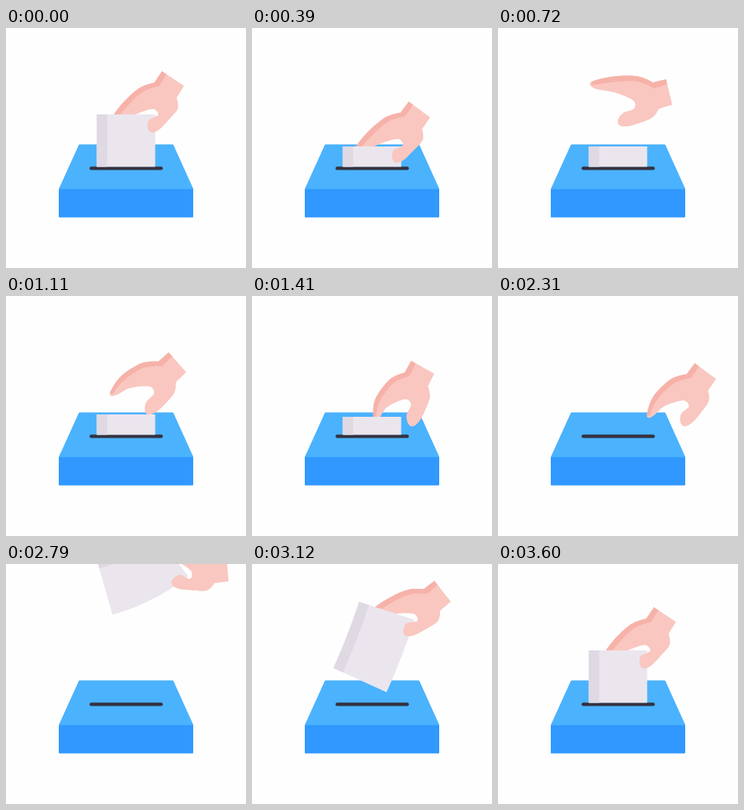
An HTML page for the animation above (5.63 s loop, 300 by 300 pixels).

```html
<!DOCTYPE html>
<html lang="en">
<head>
<meta charset="utf-8">
<title>Ballot box</title>
<style>
  html, body { margin: 0; width: 100%; height: 100%; overflow: hidden; background: #fefefe; }
  svg { display: block; width: 100vw; height: 100vh; }
</style>
</head>
<body>
<svg viewBox="0 0 300 300">
  <defs><clipPath id="aboveSlot"><rect x="-200" y="-300" width="800" height="473.6"/></clipPath></defs>
  <g stroke-width="2" stroke-linejoin="round">
    <path d="M92 146.5H208.3L233.2 201.5H67Z" fill="#4bb2fe" stroke="#4bb2fe"/>
    <path d="M67 202.5H233V235.7H67Z" fill="#3098ff" stroke="#3098ff"/>
  </g>
  <path d="M106.5 175.4H194" stroke="#35323f" stroke-width="4.2" stroke-linecap="round"/>
  <path id="hand" fill="#f9c7c0"/>
  <path id="shade" fill="#f6b2a9"/>
  <g clip-path="url(#aboveSlot)">
    <path id="sheet" fill="#ebe6ee"/>
    <path id="fold" fill="#dfd9e4"/>
  </g>
  <path id="thumb" fill="#f9c7c0"/>
</svg>
<script>
const LOOP = 5630, MOVE = 3600, STEP = 30;
const RELEASE = 330, PRESS = 1350, GONE = 1710, RETURN = 2640;
const GRIP_ANGLE = 33.7, SHEET_W = 73, SHEET_L = 93, FOLD_W = 13;
const HOME = { x: 195, y: 54 };

const el = id => document.getElementById(id);
const rad = deg => deg * Math.PI / 180;
const mix = (a, b, k) => a + (b - a) * k;
const mixPoint = (p, q, k) => [mix(p[0], q[0], k), mix(p[1], q[1], k)];
const add = (p, q, k = 1) => [p[0] + q[0] * k, p[1] + q[1] * k];
const turn = ([x, y], deg) => {
  const c = Math.cos(rad(deg)), s = Math.sin(rad(deg));
  return [x * c - y * s, x * s + y * c];
};
const turnAbout = (p, pivot, deg, scale = 1) => add(pivot, turn(add(p, pivot, -1), deg), scale);
const str = p => p[0].toFixed(2) + ' ' + p[1].toFixed(2);

// Open hand, with the wrist edge on the x axis: wrist, palm, thumb, finger, back.
const OPEN = [
  [0, 0], [33, 0], [33.8, 18], [42.2, 28],
  [45, 45], [45.5, 60], [42, 70], [35, 70.5], [28, 62],
  [26.5, 48], [18, 45], [9, 54],
  [-.5, 68.5], [-10, 89], [-19, 92], [-19.2, 64],
  [-12.3, 34], [0, 17]
];
const CORNERS = [0, 1, 2, 17];
const THUMB_ROOT = [34, 24], FINGER_ROOT = [-4, 50];

// The thumb swings inwards as it grips; the fingers bend more towards the tip.
function outline({ x, y, angle, grip, curl }) {
  return OPEN.map((p, i) => {
    if (i >= 4 && i <= 8) p = turnAbout(p, THUMB_ROOT, 12 * grip);
    if (i >= 12 && i <= 15) {
      const reach = curl * Math.hypot(p[0] - FINGER_ROOT[0], p[1] - FINGER_ROOT[1]) / 42;
      p = turnAbout(p, FINGER_ROOT, -16 * reach, 1 - .18 * reach);
    }
    return add([x, y], turn(p, angle));
  });
}

const castVote = [
  { t: 0, ...HOME, angle: GRIP_ANGLE, grip: 1, curl: 0 },
  { t: RELEASE, x: 195, y: 94, angle: GRIP_ANGLE, grip: 1, curl: 0 },
  { t: 720, x: 210, y: 64, angle: 76, grip: 0, curl: 0 },
  { t: 1410, x: 199, y: 81, angle: 29, grip: 0, curl: 1 },
  { t: 1720, x: 199, y: 106, angle: 28, grip: 0, curl: 1 },
  { t: 2310, x: 246, y: 84, angle: 36.5, grip: .5, curl: .7 },
  { t: RETURN, x: 390, y: 66, angle: 40, grip: 1, curl: .5 }
];

// Smooth interpolation that rests at turning points.
function slope(i, key) {
  const a = castVote[i - 1], b = castVote[i], c = castVote[i + 1];
  if (!a || !c) return 0;
  const before = (b[key] - a[key]) / (b.t - a.t), after = (c[key] - b[key]) / (c.t - b.t);
  return before * after <= 0 ? 0 : 2 * before * after / (before + after);
}
function casting(t) {
  const i = castVote.findIndex((k, n) => t < castVote[n + 1].t);
  const a = castVote[i], b = castVote[i + 1], span = b.t - a.t, k = (t - a.t) / span;
  const pose = { bend: 0 };
  for (const key of ['x', 'y', 'angle', 'grip', 'curl']) {
    const drift = (1 - k) * slope(i, key) - k * slope(i + 1, key);
    pose[key] = mix(a[key], b[key], k * k * (3 - 2 * k)) + span * k * (1 - k) * drift;
  }
  return pose;
}

// The hand swoops back from the upper right and settles at home.
function returning(t) {
  const left = 2 * (MOVE - t) / (MOVE - RETURN);
  return {
    x: HOME.x + 33 * left ** 1.71,
    y: HOME.y - 33 * left ** 1.3,
    angle: GRIP_ANGLE + 18 * left ** 2.03,
    bend: 6.4 * left ** 2.36,
    grip: 1, curl: 0
  };
}

function spline(pts, corners, from, to) {
  const n = pts.length, at = i => pts[(i + n) % n];
  const tangent = i => corners.includes(i % n) ? [0, 0] : add(at(i + 1), at(i - 1), -1);
  let d = str(at(from));
  for (let i = from; i < to; i++) {
    d += 'C' + [add(at(i), tangent(i), 1 / 6), add(at(i + 1), tangent(i + 1), -1 / 6), at(i + 1)].map(str).join(' ');
  }
  return d;
}
const fillPath = (id, d) => el(id).setAttribute('d', 'M' + d + 'Z');

function drawHand(pose) {
  const pts = outline(pose);
  const inner = [[0, 1, .2], [17, 2, .22], [16, 10, .2], [15, 12, .36], [14, 13, .48]]
    .map(([a, b, k]) => mixPoint(pts[a], pts[b], k));
  fillPath('hand', spline(pts, CORNERS, 0, 18));
  fillPath('thumb', spline(pts, CORNERS, 2, 10));
  fillPath('shade', spline(pts, CORNERS, 14, 18) + 'L' + spline(inner, [0, 1, 4], 0, 4));
}

// A strip of paper following an arc, starting at the middle of its top edge.
function drawSheet(mid, angle, bend) {
  const n = 16, left = [], crease = [], right = [];
  for (let i = 0; i <= n; i++) {
    const edge = u => add(mid, turn([u, 0], angle + bend * i / n));
    left.push(edge(-SHEET_W / 2));
    crease.unshift(edge(FOLD_W - SHEET_W / 2));
    right.unshift(edge(SHEET_W / 2));
    mid = add(mid, turn([0, SHEET_L / n], angle + bend * (i + .5) / n));
  }
  fillPath('sheet', [...left, ...right].map(str).join('L'));
  fillPath('fold', [...left, ...crease].map(str).join('L'));
}

function draw(time) {
  const t = Math.min(MOVE, Math.floor(time % LOOP / STEP) * STEP);
  const pose = t < RETURN ? casting(t) : returning(t);
  drawHand(pose);
  const hidden = t >= GONE && t < RETURN;
  for (const id of ['sheet', 'fold']) el(id).style.display = hidden ? 'none' : '';
  if (t <= RELEASE || t >= RETURN) {
    const tilt = pose.angle - GRIP_ANGLE;
    drawSheet(add([pose.x, pose.y], turn([-45, 54], tilt)), tilt, pose.bend);
  } else {
    drawSheet([150, t < PRESS ? 148 : Math.max(148, pose.y + 70)], 0, 0);
  }
}

const start = performance.now();
function tick() {
  draw(performance.now() - start);
  requestAnimationFrame(tick);
}
tick();
</script>
</body>
</html>
```
